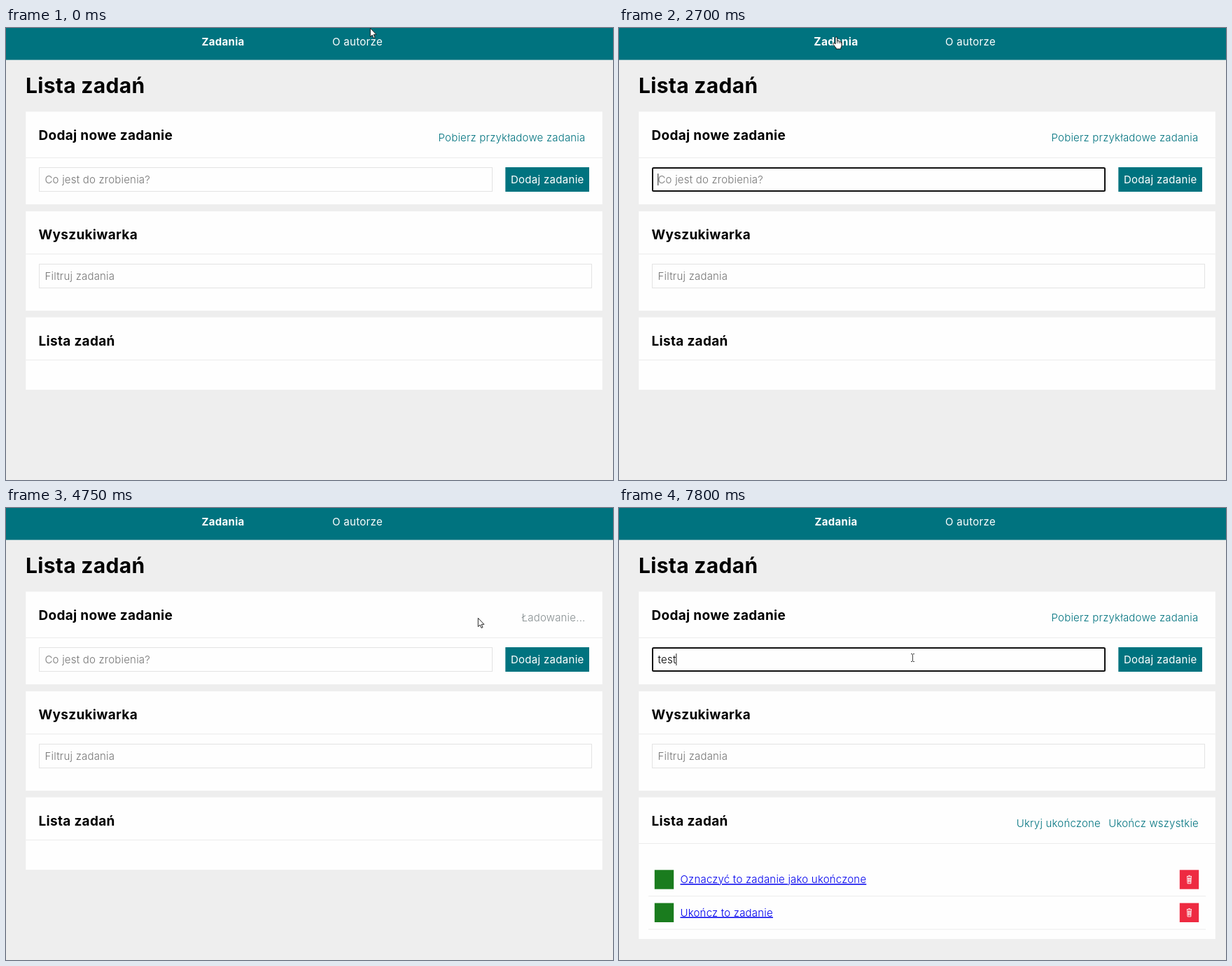
Write an HTML page that moves like this. It is 867x646 px and loops after 8 s.

```html
<!DOCTYPE html>
<html lang="pl">
<head>
<meta charset="utf-8">
<title>Lista zadań</title>
<style>
html, body { margin: 0; width: 100%; height: 100%; overflow: hidden; background: #eee; }
svg { display: block; font: 350 15px Inter, "Open Sans", sans-serif; letter-spacing: .2px; }
.teal { fill: #00737f; }
.card { fill: #fefefe; }
.line { fill: #ebebeb; }
.field { fill: #fefefe; stroke: #e3e3e3; }
.hint { fill: #757575; }
.title { font-size: 30px; font-weight: 700; letter-spacing: .3px; }
.head { font-size: 19px; font-weight: 700; letter-spacing: .3px; }
.nav { fill: #fff; text-anchor: middle; letter-spacing: .3px; transform-box: fill-box; transform-origin: center; }
.button { fill: #fff; text-anchor: middle; font-weight: 400; letter-spacing: .3px; }
.end { text-anchor: end; }
.task { fill: #00e; text-decoration: underline; }
.bio { fill: #111; letter-spacing: .15px; }
.done { fill: #1a7c1e; }
.remove { fill: #ee2a41; }
#focus { fill: none; stroke: #101010; stroke-width: 2; }
#caret { fill: #222; }
#click { fill: #fff650; fill-opacity: .85; }
#hand, #arrow { fill: #fff; stroke: #111; stroke-linejoin: round; }
#beam { fill: none; stroke: #444; }
</style>
</head>
<body>
<svg width="867" height="646" viewBox="0 0 867 646">
  <defs>
    <g id="bin" fill="none" stroke="#fff" stroke-width=".9">
      <path d="M-3.5-4.5H3.5M-1.2-5.6H1.2M-2.9-4.5L-2.4 5.8H2.4L2.9-4.5M-1-3V4.5M1-3V4.5M-2.5-1H2.5M-2.4 2H2.4"/>
    </g>
    <g id="row">
      <rect class="done" x="50.8" width="27.4" height="27.4"/>
      <rect class="remove" x="800.8" width="27.4" height="27.4"/>
      <use href="#bin" x="814.5" y="13.6"/>
      <rect class="line" x="42" y="37" width="796" height="1"/>
    </g>
    <g id="face">
      <circle r="7.3" fill="#fcc03a"/>
      <path d="M-4 1.5Q0 7 4 1.5" fill="none" stroke="#6b3d12" stroke-width="1.3" stroke-linecap="round"/>
    </g>
  </defs>

  <rect width="867" height="646" fill="#eee"/>
  <rect class="teal" width="867" height="45.6"/>
  <text class="nav" id="navTasks" y="24.5">Zadania</text>
  <text class="nav" id="navAbout" y="24.5">O autorze</text>

  <g id="tasks">
    <text class="title" x="28" y="93">Lista zadań</text>

    <rect class="card" x="28.3" y="119.5" width="823.5" height="132.5"/>
    <rect class="line" x="28.3" y="185" width="823.5" height="1"/>
    <text class="head" x="46.5" y="159.5">Dodaj nowe zadanie</text>
    <text class="end" id="fetch" x="827.5" y="162"></text>
    <rect class="field" x="47.5" y="199.5" width="647" height="34"/>
    <rect id="focus" x="48" y="200" width="646" height="33" rx="1.5"/>
    <text class="hint" id="hint" x="55.5" y="222">Co jest do zrobienia?</text>
    <text id="typed" x="55.5" y="222"></text>
    <rect id="caret" y="208" width="1" height="17"/>
    <rect class="teal" x="713.3" y="199" width="119.7" height="35"/>
    <text class="button" x="773.3" y="222">Dodaj zadanie</text>

    <rect class="card" x="28.3" y="262" width="823.5" height="142"/>
    <rect class="line" x="28.3" y="322.5" width="823.5" height="1"/>
    <text class="head" x="46.5" y="302">Wyszukiwarka</text>
    <rect class="field" x="47.5" y="337.5" width="789" height="34"/>
    <text class="hint" x="55.5" y="359.7">Filtruj zadania</text>

    <rect class="card" id="listCard" x="28.3" y="413.5" width="823.5"/>
    <rect class="line" id="listLine" x="28.3" width="823.5" height="1"/>
    <text class="head" x="46.5" y="453.5">Lista zadań</text>
    <g id="list">
      <text class="teal end" x="688" y="456">Ukryj ukończone</text>
      <text class="teal end" x="828" y="456">Ukończ wszystkie</text>
      <use href="#row" y="517.3"/>
      <use href="#row" y="564.6"/>
      <text class="task" x="87.5" y="536">Oznaczyć to zadanie jako ukończone</text>
      <text class="task" x="87.5" y="583.5">Ukończ to zadanie</text>
    </g>
  </g>

  <g id="about">
    <text class="title" x="28" y="93">O mnie</text>
    <rect class="card" x="28.3" y="119.5" width="823.5" height="286.5"/>
    <rect class="line" x="28.3" y="179" width="823.5" height="1"/>
    <text class="head" x="46.5" y="159.5">Lidia Wrzosecka</text>
    <g class="bio">
      <text x="55.5" y="217.5">Cześć!</text>
      <text x="55.5" y="249">Dotychczas zawodowo związana byłam z organizacją pozarządową z branży IT. Początkowo pracowałam</text>
      <text x="55.5" y="266">przy projektach z Nadwiślańskiego Programu Wspólnego, które moja organizacja kierowała do osób z</text>
      <text x="55.5" y="283">niepełnosprawnościami, celem nabywania umiejętności cyfrowych.</text>
      <text x="55.5" y="314.3">Przez ostatnie lata zajmowałam się organizacją i zarządzaniem projektami IT skierowanymi do klientów</text>
      <text x="55.5" y="331.3">biznesowych, głównie korporacyjnych.</text>
      <text x="55.5" y="362.5">Zawsze chciałam poszerzyć swoją wiedzę o <tspan font-style="italic">tajniki</tspan> programowania, dlatego zapisałam się na kurs.</text>
      <text x="55.5" y="379.5">Jeszcze nie wiem, gdzie mnie to zaprowadzi - sama jestem ciekawa.</text>
    </g>
    <g transform="translate(111.3 212)">
      <use href="#face"/>
      <path d="M-4.5-1Q-3-3.6-1.5-1M1.5-1Q3-3.6 4.5-1" fill="none" stroke="#6b3d12" stroke-width="1.1"/>
      <g fill="#f58b4c"><circle cx="-4.8" cy="1.3" r="1.6"/><circle cx="4.8" cy="1.3" r="1.6"/></g>
    </g>
    <g transform="translate(564 374)">
      <use href="#face"/>
      <path d="M-7.8-4.2H7.8V-2.6L6.8-2Q6.3 1.4 3.8 1.4T.7-2H-.7Q-1.3 1.4-3.8 1.4T-6.8-2L-7.8-2.6Z" fill="#2b2f38"/>
    </g>
  </g>

  <circle id="click" r="11"/>
  <g id="cursor">
    <path id="arrow" stroke-width=".9" d="M.3.3V12.6L3.1 10 5 14.4 7 13.5 5.1 9.3H8.9Z"/>
    <g id="hand">
      <path d="M-.5 10V1.2Q-.5 0 .9 0T2.3 1.2V6Q2.5 5 3.7 5.2T5 6.4Q5.4 5.6 6.3 5.9T7.3 7Q8.6 6.6 8.6 8V12Q8.4 14 7.4 15.2V17H.6V15.6Q-1.5 13.5-3.3 10.4Q-4.2 9-3.2 8.4T-.5 10Z"/>
      <path d="M2.3 6V9M5 6.4V9M7.3 7V9.2" stroke-width=".8"/>
    </g>
    <path id="beam" d="M-1-4.5H1M2-4.5H4M1.5-4V6M-1 6.5H1M2 6.5H4"/>
  </g>
</svg>
<script>
const LOOP = 8000;
const TEAL = [0, 115, 127], BRIGHT = [18, 143, 150], GREY = [134, 142, 144];
const $ = Object.fromEntries([...document.querySelectorAll("[id]")].map(el => [el.id, el]));

// Pointer moves: start, end, step count, then start, control and end points.
const moves = [
  [60, 470, 6, [520, 0], [522, 9], [526, 14]],
  [1420, 1910, 8, [526, 14], [418, 75], [309.5, 13]],
  [3160, 3940, 12, [309.5, 13], [470, 90], [674, 157]],
  [5760, 6390, 10, [674, 157], [560, 5], [418, 213]]
];
const clicks = [[680, 940], [2500, 2700], [4070, 4270], [6610, 6810]];
const keys = [7120, 7400, 7600, 7800];

const within = (t, a, b) => t >= a && t < b;
const clamp = v => Math.min(1, Math.max(0, v));
const show = (el, on) => { el.style.display = on ? "" : "none"; };
const mix = (a, b, p) => `rgb(${a.map((v, i) => Math.round(v + (b[i] - v) * p))})`;
const inBox = ([x, y], l, t, r, b) => x >= l && x <= r && y >= t && y <= b;

function pointer(t) {
  const [start, end, steps, a, c, b] = moves.filter(m => t >= m[0]).pop() || moves[0];
  if (t < start) return a;
  const step = (end - start) / (steps - 1);
  const p = clamp((Math.floor((t - start) / step + 1e-6) + 1) / steps);
  const e = p * p * (3 - 2 * p);
  return a.map((v, i) => (1 - e) ** 2 * v + 2 * e * (1 - e) * c[i] + e * e * b[i]);
}

function setNav(el, active, hover, boldX, plainX) {
  el.setAttribute("x", active ? boldX : plainX);
  el.style.fontWeight = active ? 700 : 400;
  el.style.transform = hover ? "scale(1.04)" : "";
}

function linkColor(t, hover) {
  if (within(t, 4270, 5410)) return mix(BRIGHT, GREY, clamp((t - 4270) / 400));
  if (within(t, 5410, 5690)) return mix(GREY, BRIGHT, clamp((t - 5480) / 140));
  return mix(TEAL, BRIGHT, hover ? 1 : 0);
}

function draw(t) {
  const at = pointer(t);
  const about = within(t, 940, 2700);
  const loading = within(t, 4270, 5410);
  const loaded = t >= 5410;
  const focused = within(t, 2700, 4070) || t >= 6610;
  const overTasks = inBox(at, 276, 8, 343, 32);
  const overAbout = inBox(at, 458, 8, 540, 32);
  const overFetch = !about && !loading && inBox(at, 615, 147, 828, 168);
  const overField = !about && inBox(at, 47, 199, 695, 234);

  setNav($.navTasks, !about, overTasks, 310, 307.7);
  setNav($.navAbout, about, overAbout, 498.5, 502);
  show($.tasks, !about);
  show($.about, about);

  $.fetch.textContent = loading ? "Ładowanie..." : "Pobierz przykładowe zadania";
  $.fetch.style.fill = linkColor(t, overFetch);
  $.listCard.setAttribute("height", loaded ? 202.5 : 103.5);
  $.listLine.setAttribute("y", loaded ? 479 : 474);
  show($.list, loaded);

  const text = "test".slice(0, keys.filter(k => t >= k).length);
  $.typed.textContent = text;
  show($.hint, !text);
  show($.focus, focused);
  show($.caret, focused && !within(t, 3200, 3700));
  $.caret.setAttribute("x", 55.3 + (text ? $.typed.getComputedTextLength() : 0));

  const hand = overTasks || overAbout || overFetch;
  show($.hand, hand);
  show($.beam, overField);
  show($.arrow, !hand && !overField);
  $.cursor.setAttribute("transform", `translate(${at})`);
  $.click.setAttribute("transform", `translate(${at})`);
  show($.click, clicks.some(([a, b]) => within(t, a, b)));
}

const origin = performance.now();
function tick() {
  draw((performance.now() - origin) % LOOP);
  requestAnimationFrame(tick);
}
draw(0);
requestAnimationFrame(tick);
</script>
</body>
</html>
```
